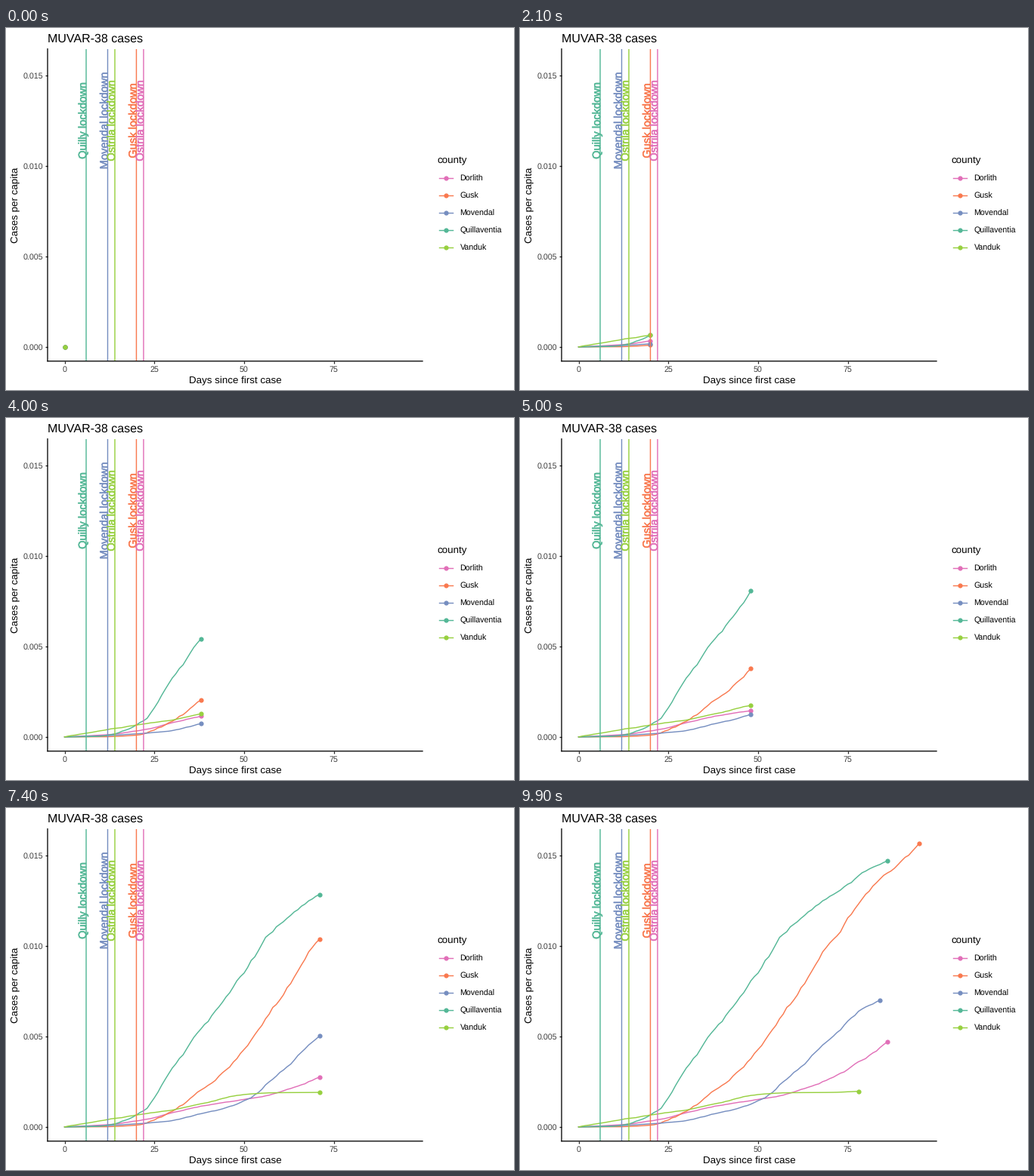
Write a matplotlib script that moves like this. It is 672 px wide and 480 px high and loops after 10 s.

```python
import matplotlib.pyplot as plt
import numpy as np
from matplotlib.animation import FuncAnimation
from matplotlib.patheffects import withStroke

W, H, DPI = 672, 480, 96
FRAMES, INTERVAL = 100, 100
LAST_DAY = 95
PEAK = 0.01569
KEY_DAYS = (0, 10, 20, 28, 38, 50, 59, 71, 80)

plt.rcParams.update({"font.family": "Liberation Sans", "text.hinting": "none"})
rng = np.random.default_rng(7)

PINK, ORANGE, BLUE = "#e16fb8", "#f9794f", "#768ec0"
TEAL, GREEN = "#53b796", "#97d040"


def monotone_cubic(t, x, y):
    """Smooth, never-falling curve through the points (x, y)."""
    h = np.diff(x)
    s = np.diff(y) / h
    inner = 2 * s[:-1] * s[1:] / (s[:-1] + s[1:])
    m = np.concatenate([s[:1], inner, s[-1:]])
    k = np.clip(np.searchsorted(x, t, side="right") - 1, 0, len(h) - 1)
    u = (t - x[k]) / h[k]
    rise = u * u * (3 - 2 * u)
    return (y[k] + rise * (y[k + 1] - y[k])
            + h[k] * u * (1 - u) * ((1 - u) * m[k] - u * m[k + 1]))


def daily_cases(end, *totals):
    """Daily running totals per capita, from totals per 100,000 on key days."""
    x = np.array([d for d in KEY_DAYS if d < end] + [end])
    y = np.array(totals, float)
    days = np.arange(end + 1)
    new = np.diff(monotone_cubic(days, x, y), prepend=0)
    cases = np.cumsum(new * rng.uniform(0.6, 1.4, len(new)))
    cases += np.interp(days, x, y - cases[x])
    return days, cases * 1e-5


COUNTIES = [
    ("Dorlith", PINK, daily_cases(86, 0, 10, 33, 68, 115, 152, 187, 275, 378, 470)),
    ("Gusk", ORANGE, daily_cases(95, 0, 1, 10, 66, 204, 428, 677, 1037, 1286, 1569)),
    ("Movendal", BLUE, daily_cases(84, 0, 6, 17, 30, 73, 145, 281, 502, 663, 700)),
    ("Quillaventia", TEAL,
     daily_cases(86, 0, 4, 66, 262, 542, 850, 1106, 1285, 1414, 1470)),
    ("Vanduk", GREEN, daily_cases(78, 0, 34, 66, 88, 128, 179, 189, 191, 197)),
]
LOCKDOWNS = [
    (6, "Quilly", TEAL),
    (12, "Movendal", BLUE),
    (14, "Ostrila", GREEN),
    (20, "Gusk", ORANGE),
    (22, "Ostrila", PINK),
]

LINE = 1.07
DOT = dict(marker="o", markersize=4.7, markeredgewidth=0, snap=False)

fig = plt.figure(figsize=(W / DPI, H / DPI), dpi=DPI, facecolor="white")


def label(x, y, text, size, **kw):
    """Text with its baseline at pixel (x, y), y counted from the top."""
    return fig.text(x / W, 1 - y / H, text, fontsize=size, **kw)


# Panel
ax = fig.add_axes([55 / W, 1 - 441.7 / H, 496 / W, 414 / H])
ax.set_xlim(-0.05 * LAST_DAY, 1.05 * LAST_DAY)
ax.set_ylim(-0.05 * PEAK, 1.05 * PEAK)
ax.set_xticks([0, 25, 50, 75])
ax.set_yticks([0, 0.005, 0.01, 0.015])
ax.yaxis.set_major_formatter("{x:.3f}")
ax.tick_params(length=2.5, width=0.97, pad=2, color="#242424",
               labelsize=8, labelcolor="#3f3f3f")
ax.spines[["top", "right"]].set_visible(False)
for side in ("left", "bottom"):
    ax.spines[side].set(linewidth=0.97, snap=False)

upright = dict(ha="center", va="baseline", rotation=90, rotation_mode="anchor")
label(55, 19, "MUVAR-38 cases", 12)
label(303, 471, "Days since first case", 10, ha="center")
label(16.5, 235, "Cases per capita", 10, **upright)

for day, place, color in LOCKDOWNS:
    ax.axvline(day, color=color, lw=LINE, zorder=2.3, snap=False)
    ax.text(day, 0.0125, place + " lockdown", color=color, fontsize=11, zorder=3,
            path_effects=[withStroke(linewidth=0.35, foreground=color)], **upright)

# Legend
label(570.5, 179, "county", 10)
for i, (name, color, _) in enumerate(COUNTIES):
    y = 199.3 + 23.04 * i
    for xs, style in (((573, 591.4), {}), ((582.2,), DOT)):
        fig.add_artist(plt.Line2D([x / W for x in xs], [1 - y / H] * len(xs),
                                  color=color, lw=LINE, **style))
    label(600.5, y + 3.8, name, 8)

# Curves with their leading dots
curves = [ax.plot([], [], color=c, lw=LINE, zorder=2.1)[0] for _, c, _ in COUNTIES]
dots = [ax.plot([], [], color=c, ls="", zorder=2.2, **DOT)[0] for _, c, _ in COUNTIES]


def update(frame):
    day = round(frame * LAST_DAY / (FRAMES - 1))
    for curve, dot, (_, _, (x, y)) in zip(curves, dots, COUNTIES):
        n = min(day + 1, len(x))
        curve.set_data(x[:n], y[:n])
        dot.set_data(x[n - 1:n], y[n - 1:n])
    return curves + dots


anim = FuncAnimation(fig, update, frames=FRAMES, interval=INTERVAL,
                     init_func=lambda: update(0), repeat=True, repeat_delay=0)
plt.show()
```
